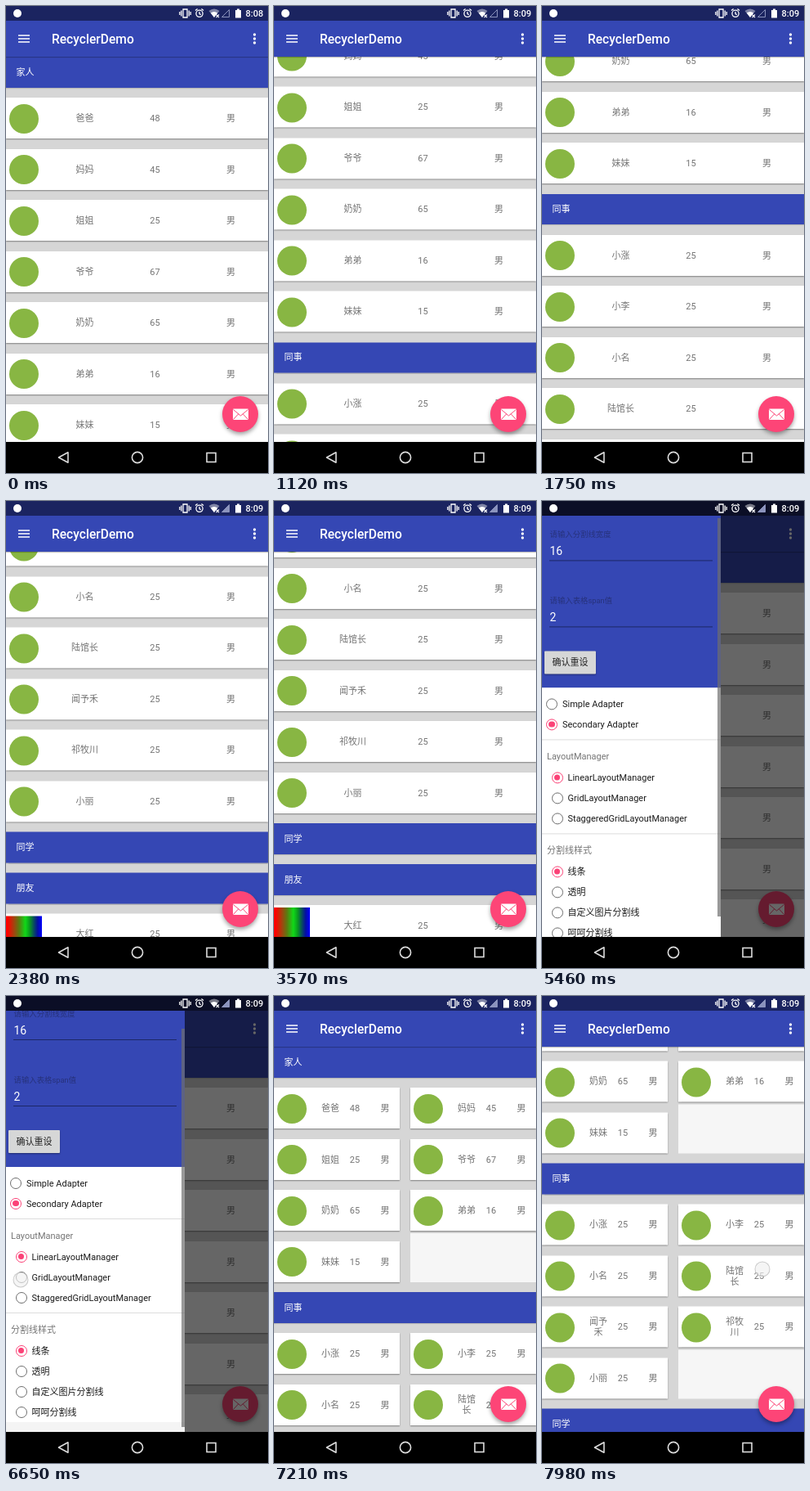
Write an HTML page that moves like this. It is 321 by 571 pixels and loops after 8 s.

```html
<!DOCTYPE html>
<html lang="zh-CN">
<head>
<meta charset="utf-8">
<title>RecyclerDemo</title>
<style>
  html, body { margin: 0; width: 100%; height: 100%; overflow: hidden; background: #000; }
  body { font: 11px/13px Roboto, "Noto Sans CJK SC", "Noto Sans CJK", sans-serif; }
  div, svg { position: absolute; }
  #stage { left: 0; top: 0; width: 321px; height: 571px; overflow: hidden; }
  .t { white-space: pre; transform: translateY(-50%); }
  .c { transform: translate(-50%, -50%); text-align: center; }
  #view { top: 62px; width: 321px; height: 471px; overflow: hidden; background: #d6d6d6; }
  .list { top: -62px; left: 0; width: 321px; }
  .head { left: 0; width: 321px; height: 37.5px; background: #3547b4; box-shadow: 0 1px 1px rgba(0,0,0,.15); }
  .card { height: 50px; background: #fff; color: #747474; box-shadow: 0 1px 1.5px rgba(0,0,0,.4); }
  .empty { left: 167px; width: 154px; height: 60px; background: #f6f6f6; }
  .dot { left: 4px; top: 7.5px; width: 36px; height: 36px; border-radius: 50%; background: #88b643; }
  .rainbow { top: 3px; width: 44px; height: 44px; overflow: hidden;
    background: linear-gradient(90deg, #f00 4%, #9a4a10 24%, #5c7a10 36%, #10d818 54%, #0a9a20 66%, #084a60 78%, #0410a0 88%, #00f); }
  #bar { top: 18px; width: 321px; height: 44px; background: #3547b4; box-shadow: 0 1px 1px rgba(0,0,0,.25); }
  #fab { left: 265px; top: 477px; width: 44px; height: 44px; border-radius: 50%; background: #fd4577;
    box-shadow: 0 3px 5px rgba(0,0,0,.35); }
  #scrim, #dark { background: #000; width: 321px; }
  #scrim { height: 533px; }
  #drawer { width: 219px; height: 533px; overflow: hidden; background: #f4f4f4; }
  #blue { top: -10px; width: 219px; height: 219px; background: #3547b4; }
  #white { top: 209px; width: 219px; height: 312px; background: #fff; }
  .line { height: 1px; }
  #button { left: 3px; top: 164px; width: 63px; height: 28px; border-radius: 1px; background: #d6d7d7;
    box-shadow: 0 1px 2px rgba(0,0,0,.4); }
  .radio { width: 12px; height: 12px; border: 1.6px solid #6e6e6e; border-radius: 50%; transform: translate(-50%, -50%); }
  .radio.on { border-color: #fb4277; }
  .radio.on::after { content: ""; position: absolute; inset: 2.2px; border-radius: 50%; background: #fb4277; }
  #thumb { left: 215px; width: 4px; height: 487px; background: rgba(110,110,110,.7); }
  #status { width: 321px; height: 18px; background: #1b2460; }
  #dark { height: 18px; }
  #nav { top: 533px; width: 321px; height: 38px; background: #000; }
  #touch { width: 17px; height: 17px; border-radius: 50%; border: 1.5px solid rgba(150,150,150,.45);
    background: rgba(240,240,240,.65); transform: translate(-50%, -50%); }
</style>
</head>
<body>
<div id="stage">
  <div id="view"></div>
  <div id="bar">
    <svg width="321" height="44">
      <path d="M15 18h14M15 22h14M15 26h14" stroke="#fff" stroke-width="1.6"/>
      <g fill="#fff"><circle cx="304.5" cy="17" r="1.7"/><circle cx="304.5" cy="22" r="1.7"/><circle cx="304.5" cy="27" r="1.7"/></g>
    </svg>
  </div>
  <div id="fab">
    <svg width="44" height="44">
      <rect x="13" y="15.5" width="19" height="13.5" rx="1" fill="#fff"/>
      <path d="M13.5 16.5L22.5 24L31.5 16.5M13.5 28.5L19.5 22M31.5 28.5L25.5 22" fill="none" stroke="#fd4577" stroke-width="1"/>
    </svg>
  </div>
  <div id="scrim"></div>
  <div id="drawer">
    <div id="panel"><div id="blue"></div><div id="white"></div><div id="button"></div></div>
    <div id="thumb"></div>
  </div>
  <div id="status">
    <div id="dark"></div>
    <svg width="321" height="18" fill="none" stroke="#fff" stroke-width="1.3">
      <circle cx="14" cy="9" r="5" fill="#fff" stroke="none"/>
      <path d="M217 4h5v10h-5zM214.8 5.5v7M224.2 5.5v7M212.8 7v4M226.2 7v4"/>
      <circle cx="237" cy="9.3" r="4.1"/>
      <path d="M237 7v2.6l1.8 1M232 5.6l2.6-2.2M242 5.6l-2.6-2.2"/>
      <path d="M248.5 6q6.5-5 13 0l-6.5 8z" fill="#fff" fill-opacity=".45" stroke="none"/>
      <path d="M250.8 8.6q4.2-3 8.4 0l-4.2 5.4z" fill="#fff" stroke="none"/>
      <path d="M257.5 10.5l3.5 3.5M261 10.5l-3.5 3.5" stroke-width="1.1"/>
      <path id="signal" d="M264.5 13.5h9v-9z" stroke="#8b93bd" stroke-width="1"/>
      <path d="M281 5h2v-1.5h3V5h2v9.5h-7z" fill="#fff" stroke="none"/>
    </svg>
  </div>
  <div id="nav">
    <svg width="321" height="38" fill="none" stroke="#dcdcdc" stroke-width="1.6">
      <path d="M64.5 19L76 12.8V25.2Z" stroke-linejoin="round"/>
      <circle cx="161" cy="19" r="6.6"/>
      <rect x="246" y="13.5" width="11" height="11"/>
    </svg>
  </div>
  <div id="touch"></div>
</div>
<script>
const $ = id => document.getElementById(id);

function add(parent, cls, style, text = '') {
  const el = document.createElement('div');
  el.className = cls;
  for (const k in style) el.style[k] = typeof style[k] === 'number' ? style[k] + 'px' : style[k];
  el.textContent = text;
  parent.append(el);
  return el;
}
const label = (parent, text, left, top, color, fontSize = 11, cls = 't') =>
  add(parent, cls, { left, top, color, fontSize }, text);

// Contact list: [section, rows of name and age]
const sections = [
  ['家人', ['爸爸 48', '妈妈 45', '姐姐 25', '爷爷 67', '奶奶 65', '弟弟 16', '妹妹 15']],
  ['同事', ['小涨 25', '小李 25', '小名 25', '陆馆长 25', '闻予禾 25', '祁牧川 25', '小丽 25']],
  ['同学', []],
  ['朋友', ['大红 25', '大黄 25', '大绿 25', '大蓝 25', '大紫 25']]
];

function buildList(cols) {
  const list = add($('view'), 'list', {});
  const grid = cols === 2;
  const [nameX, ageX, sexX] = grid ? [69, 99, 136] : [96.5, 182.5, 275.5];
  let y = 62;
  for (const [title, rows] of sections) {
    const head = add(list, 'head', { top: y });
    label(head, title, 12.5, 18.7, '#fff');
    y += 50;
    rows.forEach((row, i) => {
      const [name, age] = row.split(' ');
      const col = i % cols;
      const card = add(list, 'card', { left: col * 167, top: y, width: grid ? 154 : 321 });
      add(card, title === '朋友' ? 'rainbow' : 'dot', {});
      const shown = grid && name.length > 2 ? name.slice(0, 2) + '\n' + name.slice(2) : name;
      label(card, shown, nameX, 25, '', 11, 't c');
      label(card, age, ageX, 25, '', 11, 't c');
      label(card, '男', sexX, 25, '', 11, 't c');
      const last = i === rows.length - 1;
      if (grid && last && col === 0) add(list, 'empty', { top: y - 10 });
      if (col === cols - 1 || last) y += 62.5;
    });
  }
  return list;
}
const linear = buildList(1), grid = buildList(2);

label($('bar'), 'RecyclerDemo', 56, 22.5, '#fff', 15.6).style.fontWeight = 500;
const clock = label($('status'), '8:08', 293.5, 9, '#fff', 11);
clock.style.fontWeight = 500;

const panel = $('panel');
function field(hint, value, y) {
  label(panel, hint, 9.5, y, '#27327c', 9.4);
  label(panel, value, 9.5, y + 21, '#fff', 14);
  add(panel, 'line', { left: 9, top: y + 32, width: 200, background: '#1c2766' });
}
function radio(text, x, y, on) {
  const el = add(panel, 'radio' + (on ? ' on' : ''), { left: x, top: y });
  label(panel, text, x + 13, y, '#1c1c1c');
  return el;
}
const rule = top => add(panel, 'line', { left: 0, top, width: 219, background: '#dcdcdc' });

field('请输入分割线宽度', '16', 21);
field('请输入表格span值', '2', 102);
label($('button'), '确认重设', 31.5, 14, '#222', 11, 't c');
radio('Simple Adapter', 12, 228.5);
radio('Secondary Adapter', 12, 253.5, true);
rule(272);
label(panel, 'LayoutManager', 6, 293, '#757575');
const linearRadio = radio('LinearLayoutManager', 18.5, 318.5, true);
const gridRadio = radio('GridLayoutManager', 18.5, 343.5);
radio('StaggeredGridLayoutManager', 18.5, 368.5);
rule(387);
label(panel, '分割线样式', 6, 407.5, '#757575');
['线条', '透明', '自定义图片分割线', '呵呵分割线'].forEach((s, i) => radio(s, 18.5, 433.5 + i * 25, !i));

// Smooth curve through [time, value] points without overshoot
function track(pts) {
  const sec = pts.slice(1).map((p, i) => (p[1] - pts[i][1]) / (p[0] - pts[i][0]));
  const slope = pts.map((_, i) => {
    const a = sec[i - 1], b = sec[i];
    return a * b > 0 ? 2 * a * b / (a + b) : 0;
  });
  return t => {
    if (t <= pts[0][0]) return pts[0][1];
    const i = pts.findIndex(p => p[0] >= t) - 1;
    if (i < 0) return pts[pts.length - 1][1];
    const [t0, v0] = pts[i], [t1, v1] = pts[i + 1];
    const d = t1 - t0, u = (t - t0) / d, w = 1 - u;
    return v0 * w * w * (1 + 2 * u) + v1 * u * u * (3 - 2 * u)
      + d * u * w * (slope[i] * w - slope[i + 1] * u);
  };
}
const scroll = track([[560, 0], [840, 60], [1120, 138.5], [1400, 190], [1470, 190], [1750, 320], [2030, 400],
  [2100, 400], [2380, 632.5], [2660, 790], [2940, 850], [3290, 730], [3570, 643], [3780, 610], [3850, 585],
  [4200, 220], [4620, 0], [7420, 0], [7700, 65], [7980, 157.5]]);
const slide = track([[5040, 0], [5180, 0.5], [5390, 1], [6790, 1], [6930, 0.6], [7210, 0]]);
const panelScroll = track([[5390, 0], [5670, 23]]);

// Finger marks that ride along with the list: [from, to, x, y at the end]
const drags = [[700, 1050, 243, 328], [3010, 3430, 230, 456], [7630, 7980, 270, 334]];

function finger(t) {
  if (t >= 6650 && t < 6790) return [18, 347];
  const d = drags.find(([a, b]) => t >= a && t <= b);
  return d && [d[2], d[3] + scroll(d[1]) - scroll(t)];
}

function draw(now) {
  const t = Math.floor((now % 8000) / 70) * 70;
  const picked = t >= 6720;
  const s = scroll(t), open = slide(t), ps = panelScroll(t);
  linear.style.display = picked ? 'none' : '';
  grid.style.display = picked ? '' : 'none';
  (picked ? grid : linear).style.transform = `translateY(${-s}px)`;
  linearRadio.classList.toggle('on', !picked);
  gridRadio.classList.toggle('on', picked);

  $('drawer').style.transform = `translateX(${219 * (open - 1)}px)`;
  $('drawer').style.visibility = open ? 'visible' : 'hidden';
  $('scrim').style.opacity = $('dark').style.opacity = 0.6 * open;
  panel.style.transform = `translateY(${23 - ps}px)`;
  $('thumb').style.top = 18 + ps * 0.96 + 'px';
  $('thumb').style.opacity = t > 5390 ? 1 : 0;

  clock.textContent = t < 420 ? '8:08' : '8:09';
  $('signal').setAttribute('fill', t < 2100 ? 'none' : '#8b93bd');

  const f = finger(t);
  $('touch').style.display = f ? '' : 'none';
  if (f) {
    $('touch').style.left = f[0] + 'px';
    $('touch').style.top = f[1] + 'px';
  }
}
function loop() {
  draw(performance.now());
  requestAnimationFrame(loop);
}
loop();
</script>
</body>
</html>
```
